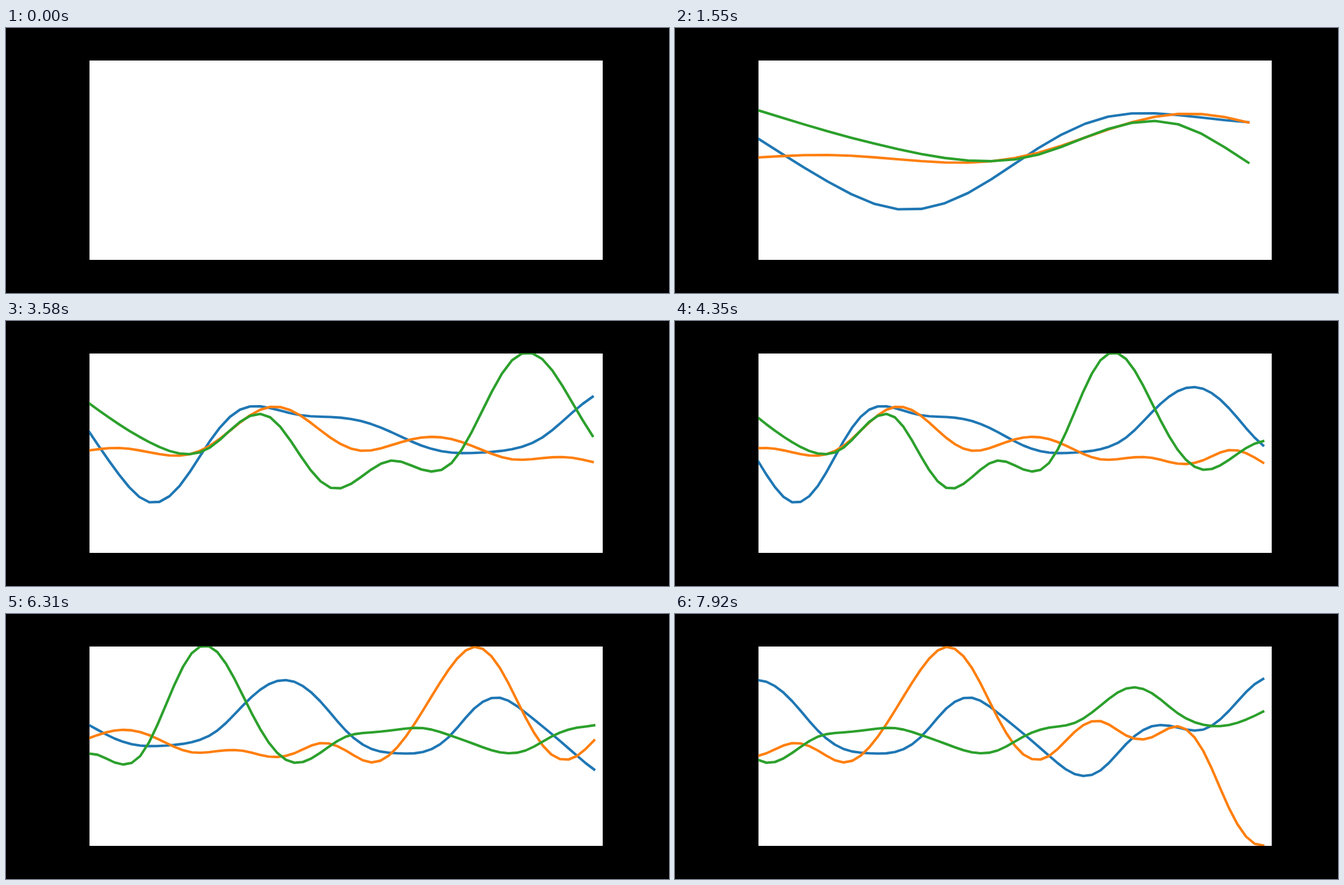
These frames come from a looping animation (1080x432 px, 7.99 s). An HTML page with a canvas:

```html
<!DOCTYPE html>
<html lang="en">
<head>
<meta charset="utf-8">
<title>Scrolling line plot</title>
<style>
  html, body { margin: 0; width: 100%; height: 100%; overflow: hidden; background: #000; }
  canvas { display: block; }
</style>
</head>
<body>
<canvas id="plot" width="1080" height="432"></canvas>
<script>
const ctx = document.getElementById('plot').getContext('2d');
const LOOP = 7990, FIRST_HOLD = 150, STEP = 70;
const WINDOW = 60, LEFT = 135, WIDTH = 837;
const KNOT_GAP = 3, SAMPLES = 113;

// Heights at every third sample; a natural cubic spline fills in the rest.
const series = [
  { color: '#1f77b4', knots: [
    180, 250.5, 295.5, 269, 196, 144.5, 142, 153.5, 156.5, 163, 181, 203, 214.5,
    214.5, 209, 190, 149, 114.5, 110.5, 142, 190, 220, 227, 225, 201, 154, 136.5,
    161, 195, 231, 261, 255, 212, 183, 185, 188.5, 158, 114.5, 96] },
  { color: '#ff7f0e', knots: [
    211, 207, 214, 219.5, 203.5, 165.5, 140, 154, 190.5, 211.5, 202.5, 190, 192.5,
    210, 225.5, 223.5, 223, 232.5, 227, 210.5, 222.5, 242, 217.5, 157.5, 91, 53.5, 88,
    169, 229, 231.5, 192, 174.5, 198, 201, 183, 223, 316, 374.5, 367] },
  { color: '#2ca02c', knots: [
    134, 168.5, 197.5, 216, 206.5, 164.5, 157, 219.5, 272, 254.5, 227.5, 242, 231.5,
    148, 64, 62, 133.5, 209.5, 242.5, 226.5, 200, 193, 188.5, 186, 197, 212, 225.5,
    222.5, 200, 185.3, 177.5, 149.5, 121.5, 129, 161.5, 180.5, 181, 166, 144] }
];

// Natural cubic spline through evenly spaced knots, in knot units.
function spline(y) {
  const last = y.length - 1, c = [0], d = [0], m = Array(y.length).fill(0);
  for (let i = 1; i < last; i++) {
    const pivot = 4 - c[i - 1];
    c[i] = 1 / pivot;
    d[i] = (6 * (y[i - 1] - 2 * y[i] + y[i + 1]) - d[i - 1]) / pivot;
  }
  for (let i = last - 1; i > 0; i--) m[i] = d[i] - c[i] * m[i + 1];
  return x => {
    const i = Math.min(Math.floor(x), last - 1), b = x - i, a = 1 - b;
    return a * y[i] + b * y[i + 1] + ((a ** 3 - a) * m[i] + (b ** 3 - b) * m[i + 1]) / 6;
  };
}

for (const s of series) {
  const curve = spline(s.knots);
  s.values = Array.from({ length: SAMPLES }, (_, i) => curve(i / KNOT_GAP));
}

function draw(now) {
  const t = now % LOOP;
  const newest = t < FIRST_HOLD ? 0 : Math.floor((t - FIRST_HOLD) / STEP) + 1;
  const span = Math.min(newest + 1, WINDOW);
  const start = newest + 1 - span;

  ctx.fillStyle = '#000';
  ctx.fillRect(0, 0, 1080, 432);
  ctx.fillStyle = '#fff';
  ctx.fillRect(136, 53, 836, 325);

  if (newest > 0) {
    ctx.save();
    ctx.beginPath();
    ctx.rect(135.5, 52.5, 836.5, 325.5);
    ctx.clip();
    ctx.lineWidth = 4.1;
    ctx.lineCap = 'square';
    ctx.lineJoin = 'round';
    for (const { color, values } of series) {
      ctx.strokeStyle = color;
      ctx.beginPath();
      for (let i = start; i <= newest; i++) {
        ctx.lineTo(LEFT + WIDTH * (i - start) / span, values[i]);
      }
      ctx.stroke();
    }
    ctx.restore();
  }
  requestAnimationFrame(draw);
}
requestAnimationFrame(draw);
</script>
</body>
</html>
```
